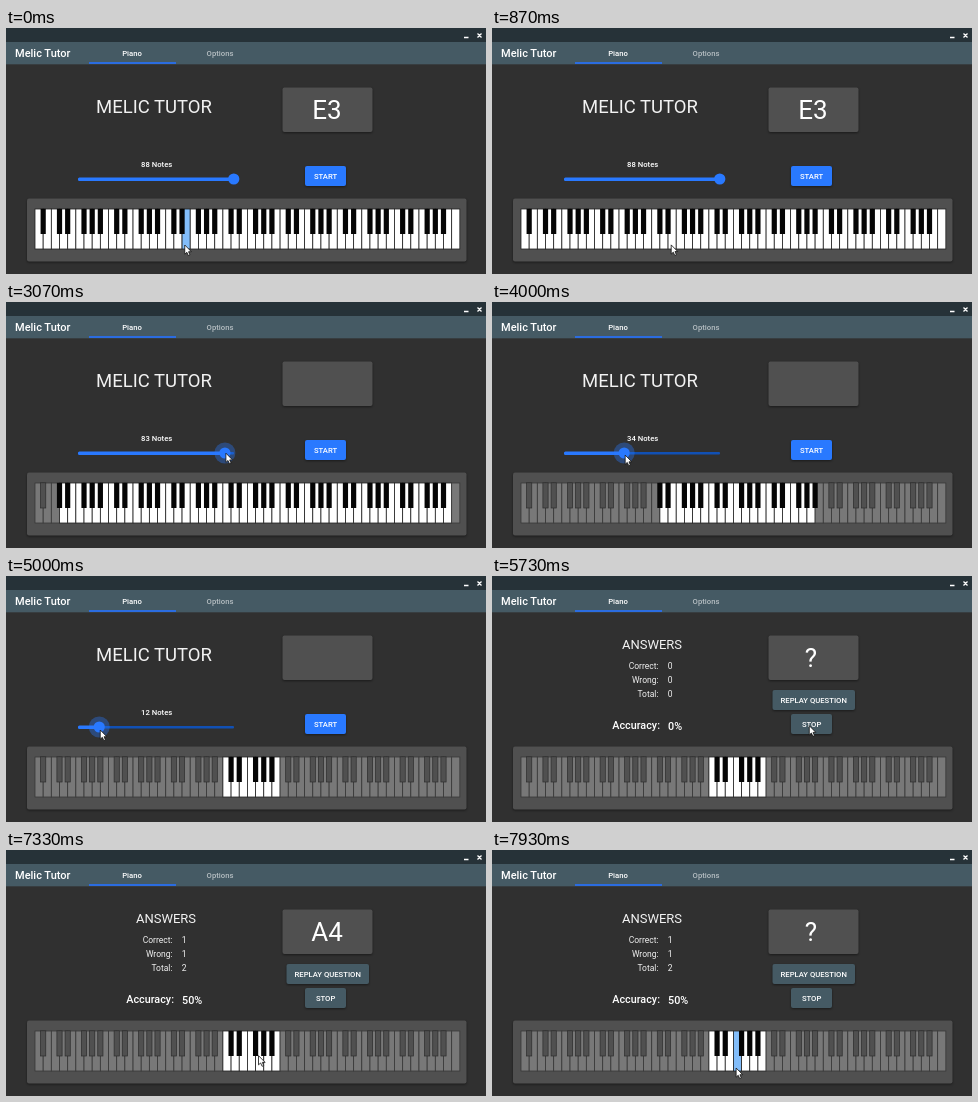
Recreate the animation shown at these times as an HTML page. Size 480 px wide and 246 px high, loop 8000 ms.

```html
<!DOCTYPE html>
<html lang="en">
<head>
<meta charset="utf-8">
<title>Melic Tutor</title>
<style>
  html, body { margin: 0; width: 100%; height: 100%; overflow: hidden; background: #303030; }
  svg { display: block; width: 100%; height: 100%; font-family: Roboto, "Open Sans", sans-serif; fill: #fff; }
  .mid { text-anchor: middle; }
  .end { text-anchor: end; }
  .bold { font-weight: 500; }
  .small { font-size: 7.7px; font-weight: 500; }
  .row { font-size: 8.5px; fill: #f2f2f2; }
  .raised { filter: drop-shadow(0 1px 1.2px rgba(0, 0, 0, .45)); }
  .card { fill: #505050; }
  .blue { fill: #2979ff; }
  .slate { fill: #455a64; }
  .white { fill: #fff; stroke: #222; stroke-width: .8; }
  .black { fill: #050505; }
  .white.off { fill: #787878; stroke: #383838; }
  .black.off { fill: #505050; stroke: #2c2c2c; stroke-width: .7; }
  .white.on { fill: #82bdfa; }
  .black.on { fill: #3f70b4; stroke: #24446f; stroke-width: .6; }
  .white.bad { fill: #c60606; }
</style>
</head>
<body>
<svg viewBox="0 0 480 246" preserveAspectRatio="none">
  <rect width="480" height="246" fill="#303030"/>
  <rect class="slate" y="14" width="480" height="22.3"/>
  <rect width="480" height="14" fill="#263238"/>
  <path d="M458 9.5h4.5M471.5 5.5l4 4m0-4l-4 4" stroke="#fff" stroke-width="1.3" fill="none"/>
  <text class="bold" x="9" y="29" font-size="11">Melic Tutor</text>
  <text class="small mid" x="126" y="28">Piano</text>
  <text class="small mid" x="214" y="28" opacity=".6">Options</text>
  <rect x="83" y="34" width="87" height="2" fill="#2b6ce0"/>

  <rect class="card raised" x="276.5" y="59.5" width="90" height="44.5" rx="2"/>
  <text id="note" class="mid" y="91" font-size="26"></text>

  <g id="home">
    <text class="mid" x="148" y="84.7" font-size="18.5" fill="#f2f2f2">MELIC TUTOR</text>
    <text id="count" class="small mid" x="150.7" y="139"></text>
    <rect x="72" y="150" width="156" height="2.5" rx="1" fill="#1150b4"/>
    <rect id="fill" class="blue" x="72" y="149.5" height="3.5" rx="1.5"/>
    <circle id="halo" class="blue" cy="151" r="10.5"/>
    <circle id="thumb" class="blue" cy="151" r="5.6"/>
    <rect class="blue raised" x="299" y="138" width="41" height="20" rx="2"/>
    <text class="small mid" x="319.6" y="150.8">START</text>
  </g>

  <g id="quiz">
    <text class="mid" x="160" y="73.4" font-size="13" fill="#f2f2f2">ANSWERS</text>
    <text class="row end" x="166.5" y="93">Correct:</text>
    <text class="row end" x="166.5" y="107">Wrong:</text>
    <text class="row end" x="166.5" y="121.2">Total:</text>
    <text class="row" id="right" x="175.8" y="93"></text>
    <text class="row" id="wrong" x="175.8" y="107"></text>
    <text class="row" id="total" x="175.8" y="121.2"></text>
    <text class="bold end" x="168" y="153.4" font-size="10.8">Accuracy:</text>
    <text class="bold" id="rate" x="176" y="154.2" font-size="10.8"></text>
    <rect class="slate raised" x="280.5" y="114" width="82.5" height="20" rx="2"/>
    <text class="small mid" x="321.7" y="126.8">REPLAY QUESTION</text>
    <rect class="slate raised" x="299" y="138" width="41" height="20" rx="2"/>
    <text class="small mid" x="319.6" y="150.8">STOP</text>
  </g>

  <rect class="card raised" x="21" y="170.5" width="439.5" height="63" rx="2"/>
  <g id="whites"></g>
  <g id="blacks"></g>
  <path id="mouse" d="M0 0V9.2L2.1 7.3L3.6 10.6L5.2 9.9L3.8 6.7H6.6Z" fill="#fff" stroke="#111" stroke-width=".8" stroke-linejoin="round"/>
</svg>
<script>
const LOOP = 8000, KEYS = 88, KEY_W = 8.17, KEYS_X = 29;
const NAMES = ['A', 'Bb', 'B', 'C', 'Db', 'D', 'Eb', 'E', 'F', 'Gb', 'G', 'Ab'];
const DRAG = { down: 2780, up: 4680 }, START = 5600, GUESS = 6200, SOLVED = 6730, NEXT = 7500;
const $ = id => document.getElementById(id);

function ease(t, from, to) {
  const k = Math.min(1, Math.max(0, (t - from) / (to - from)));
  return k * k * (3 - 2 * k);
}
const mix = (a, b, k) => a + (b - a) * k;
const noteName = i => NAMES[i % 12] + Math.floor((i + 9) / 12);
const notesAt = t => Math.round(mix(KEYS, 12, ease(t, DRAG.down, DRAG.up)));
const thumbX = n => 72 + 1.77 * n;

function makeKey(isBlack, x) {
  const el = document.createElementNS('http://www.w3.org/2000/svg', 'rect');
  const attrs = isBlack
    ? { x: x - 2.6, y: 180.8, width: 5.2, height: 25.2 }
    : { x, y: 181, width: KEY_W, height: 40 };
  for (const name in attrs) el.setAttribute(name, attrs[name]);
  $(isBlack ? 'blacks' : 'whites').append(el);
  return { el, base: isBlack ? 'black' : 'white', hitX: isBlack ? x : x + 2.7 };
}

const keys = [];
let whiteCount = 0;
for (let i = 0; i < KEYS; i++) {
  const isBlack = NAMES[i % 12].length > 1;
  keys.push(makeKey(isBlack, KEYS_X + whiteCount * KEY_W));
  if (!isBlack) whiteCount++;
}

const press = (note, down, up, y, look = 'on', clear = up) => {
  const key = keys.findIndex((_, i) => noteName(i) === note);
  return { note, key, down, up, look, clear, pos: () => [keys[key].hitX, y] };
};
const presses = [
  press('E3', 0, 850, 217),
  press('F3', 1000, 1660, 215),
  press('Gb3', 1800, 2080, 206),
  press('G4', GUESS, 6330, 213, 'bad', SOLVED),
  press('A4', 6570, 6850, 194),
  press('F4', 7830, LOOP, 218)
];

// the pointer rests at each stop and eases between them
const stops = [
  ...presses,
  { ...DRAG, up: 5010, pos: t => [thumbX(notesAt(t)) + 1, 151 + 3 * ease(t, DRAG.down, DRAG.up)] },
  { down: 5450, up: 5700, pos: () => [318, 149] }
].sort((a, b) => a.down - b.down);

function mouseAt(t) {
  const i = Math.max(0, stops.findLastIndex(s => s.down <= t));
  const here = stops[i], next = stops[i + 1] || here;
  const k = next === here ? 0 : ease(t, here.up, next.down);
  const a = here.pos(t), b = next.pos(t);
  return a.map((v, j) => mix(v, b[j], k));
}

function labelAt(t) {
  if (t >= START) return t >= SOLVED && t < NEXT ? 'A4' : '?';
  return t < DRAG.down ? presses.findLast(p => p.down <= t).note : '';
}

function drawKeys(t, n) {
  const cut = KEYS - n;
  const first = Math.min(cut, Math.ceil(cut / 2) + 1);
  keys.forEach(({ el, base }, i) => {
    const hit = presses.find(p => p.key === i && t >= p.down && t < p.clear);
    const off = i < first || i >= first + n;
    el.setAttribute('class', `${base} ${hit ? hit.look : off ? 'off' : ''}`);
  });
}

function drawSlider(t, n) {
  const x = thumbX(n);
  $('count').textContent = n + ' Notes';
  $('fill').setAttribute('width', x - 72);
  $('thumb').setAttribute('cx', x);
  $('halo').setAttribute('cx', x);
  $('halo').setAttribute('opacity', .36 * (ease(t, 2750, 2870) - ease(t, 5010, 5200)));
}

function drawScore(t) {
  const wrong = +(t >= GUESS), right = +(t >= SOLVED), total = right + wrong;
  $('right').textContent = right;
  $('wrong').textContent = wrong;
  $('total').textContent = total;
  $('rate').textContent = Math.round(100 * right / Math.max(1, total)) + '%';
}

function draw(t) {
  const n = notesAt(t), label = labelAt(t);
  drawKeys(t, n);
  drawSlider(t, n);
  drawScore(t);
  $('note').textContent = label;
  $('note').setAttribute('x', 317 + 2 * label.length);
  $('home').style.display = t < START ? '' : 'none';
  $('quiz').style.display = t < START ? 'none' : '';
  $('mouse').setAttribute('transform', `translate(${mouseAt(t)})`);
}

const begin = performance.now();
function tick() {
  draw(Math.max(0, performance.now() - begin) % LOOP);
  requestAnimationFrame(tick);
}
tick();
</script>
</body>
</html>
```
